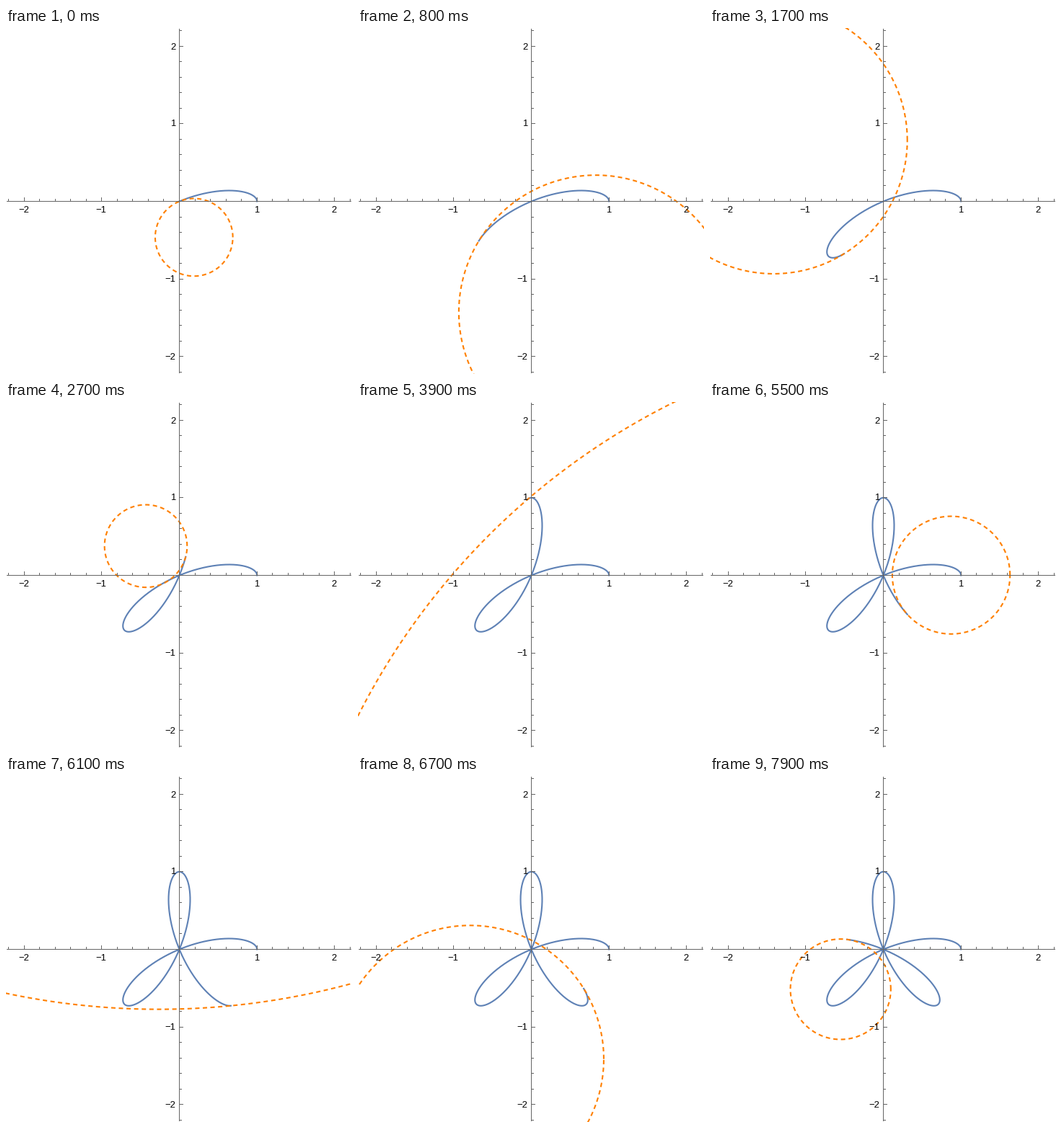
A matplotlib script for the animation above (8000 ms loop, 480 by 480 pixels).

```python
import numpy as np
import matplotlib.pyplot as plt
from matplotlib.animation import FuncAnimation

SIZE, DPI = 480, 100
UNIT = 107.7            # pixels per plot unit
MID = 240.5             # pixel position of the axes' crossing
PT = 72 / DPI           # points per pixel
FRAMES, INTERVAL = 80, 100
START, STEP = np.pi / 8 + 0.001, np.pi / 100
BLUE, ORANGE, GRAY = "#5e81b5", "#ff8000", "#666666"

plt.rcParams["lines.scale_dashes"] = False
plt.rcParams["font.family"] = "Liberation Sans"

fig = plt.figure(figsize=(SIZE / DPI, SIZE / DPI), dpi=DPI, facecolor="white")
ax = fig.add_axes([0, 0, 1, 1])
ax.set_xlim(0, SIZE)
ax.set_ylim(SIZE, 0)
ax.axis("off")


def px(x, y):
    return MID + UNIT * np.asarray(x), MID - UNIT * np.asarray(y)


def rose(t):
    r = np.cos(4 * t)
    return r * np.cos(t), r * np.sin(t)


def curvature_circle(t):
    """Centre and radius of the tangent circle whose radius is the curvature."""
    r, dr = np.cos(4 * t), -4 * np.sin(4 * t)
    speed = np.hypot(r, dr)
    k = (17 * r**2 + 2 * dr**2) / speed**3
    tx = (dr * np.cos(t) - r * np.sin(t)) / speed
    ty = (dr * np.sin(t) + r * np.cos(t)) / speed
    x, y = rose(t)
    return x - k * ty, y + k * tx, k


def rule(x, y):
    ax.plot(x, y, color=GRAY, lw=PT, zorder=4, solid_capstyle="butt", snap=False)


def draw_axes():
    rule([1, SIZE - 1], [MID, MID])
    rule([MID, MID], [1, SIZE - 1])
    for i in range(-11, 12):
        if i == 0:
            continue
        size = 3.5 if i % 5 else 5.5
        # ticks sit on whole pixels
        x, y = (np.floor(v) + 0.5 for v in px(i / 5, i / 5))
        rule([x, x], [MID, MID - size])
        rule([MID, MID + size], [y, y])
        if i % 5 == 0:
            label = str(i // 5).replace("-", "\u2212")
            style = dict(fontsize=13 * PT, color="black", va="baseline", zorder=5)
            ax.text(x - 0.7, 255.7, label, ha="center", **style)
            ax.text(235.7, y + 4, label, ha="right", **style)


draw_axes()
trace, = ax.plot([], [], color=BLUE, lw=2.1 * PT, zorder=2)
circle, = ax.plot([], [], color=ORANGE, lw=2.1 * PT, zorder=3,
                  dashes=(6 * PT, 4.6 * PT), dash_capstyle="butt")
turn = np.linspace(0, 2 * np.pi, 1441)


def update(n):
    t = START + n * STEP
    trace.set_data(*px(*rose(np.linspace(0, t, 600))))
    cx, cy, r = curvature_circle(t)
    circle.set_data(*px(cx + r * np.cos(turn), cy + r * np.sin(turn)))
    return trace, circle


anim = FuncAnimation(fig, update, frames=FRAMES, interval=INTERVAL,
                     repeat=True, repeat_delay=0)
plt.show()
```
